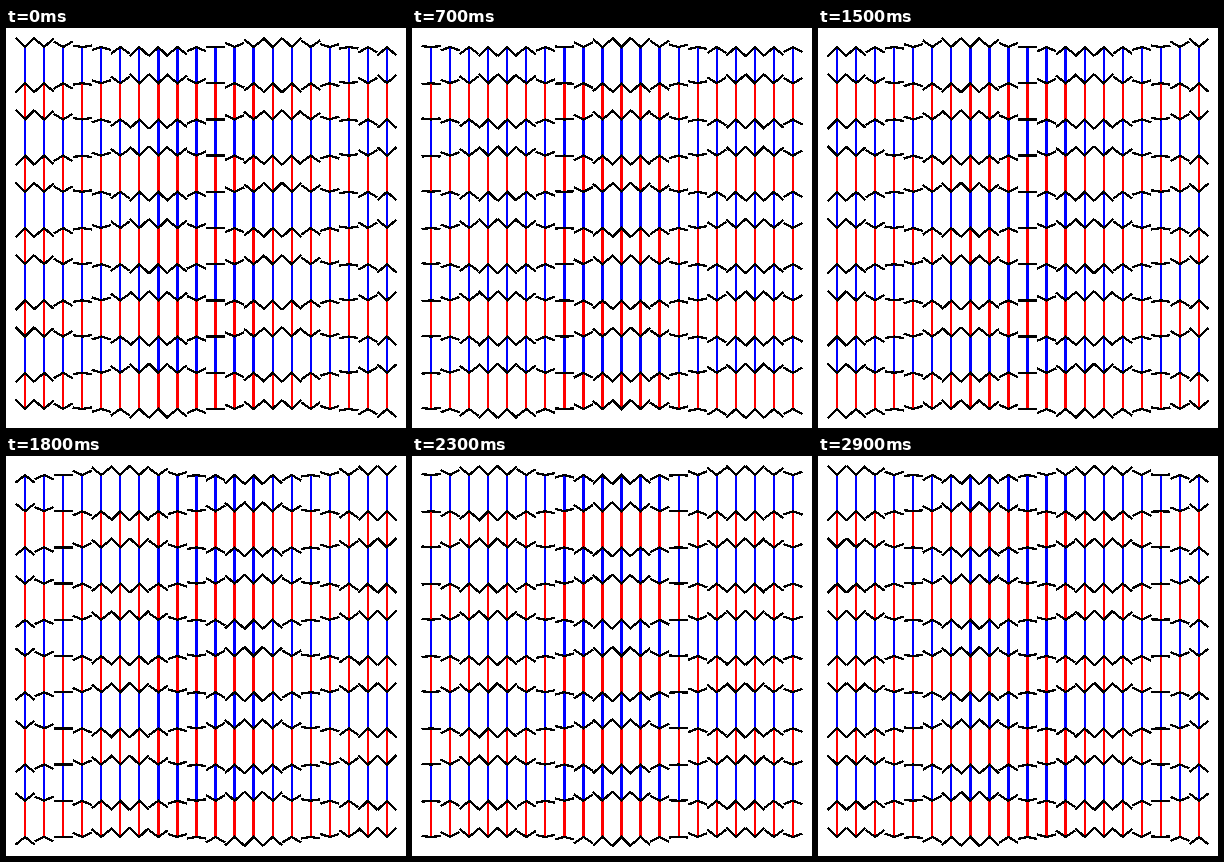
These frames come from a looping animation (400 px wide and 400 px high, 3 s). An HTML page:

```html
<!DOCTYPE html>
<html lang="en">
<head>
<meta charset="utf-8">
<title>Pulsing arrow grid</title>
<style>
  html, body { margin: 0; width: 100%; height: 100%; overflow: hidden; background: #fff; }
  svg { display: block; width: 100vw; height: 100vh; }
  path { fill: none; stroke-width: 2.3; shape-rendering: crispEdges; }
</style>
</head>
<body>
<svg viewBox="0 0 400 400"></svg>
<script>
const COLS = 20, ROWS = 11, SIZE = 400;
const STEPS = 30, STEP_MS = 100;
const gapX = SIZE / (COLS + 1);
const gapY = (SIZE - 2 * gapX) / (ROWS - 1);
const fin = gapX / 2;
const svg = document.querySelector('svg');

const colX = k => gapX * (k + 1);
const rowY = r => gapX + gapY * r;

function addPath(color, d = '') {
  const path = document.createElementNS('http://www.w3.org/2000/svg', 'path');
  path.setAttribute('stroke', color);
  path.setAttribute('d', d);
  svg.append(path);
  return path;
}

// Equal segments, alternating colour down each column
for (let r = 0; r < ROWS - 1; r++) {
  let d = '';
  for (let k = 0; k < COLS; k++) d += `M${colX(k)} ${rowY(r)}V${rowY(r + 1)}`;
  addPath(r % 2 ? '#f00' : '#00f', d);
}

const fins = addPath('#000');

function draw(step) {
  let d = '';
  for (let k = 0; k < COLS; k++) {
    const lift = fin * Math.cos(3 * Math.PI * k / COLS + 2 * Math.PI * step / STEPS);
    const x = colX(k);
    for (let r = 0; r < ROWS; r++) {
      const y = rowY(r), end = y + (r % 2 ? lift : -lift);
      d += `M${x - fin} ${end}L${x} ${y}L${x + fin} ${end}`;
    }
  }
  fins.setAttribute('d', d);
}

let shown = -1;
function tick() {
  const step = Math.floor(performance.now() / STEP_MS) % STEPS;
  if (step !== shown) draw(shown = step);
  requestAnimationFrame(tick);
}
tick();
</script>
</body>
</html>
```
